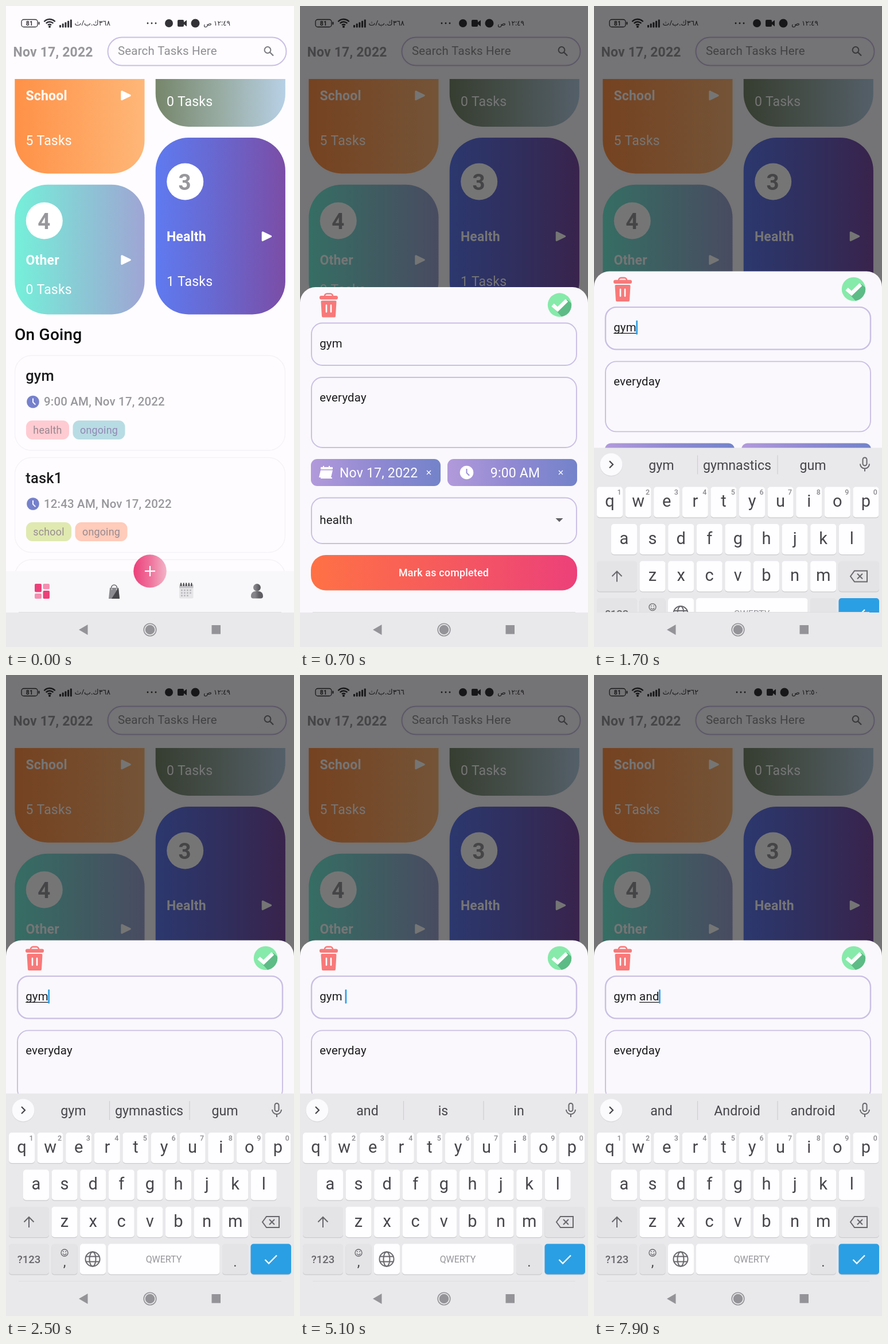
Recreate the animation shown at these times as an HTML page with a canvas. Size 502 px wide and 1115 px high, loop 8000 ms.

```html
<!DOCTYPE html>
<html lang="en">
<head>
<meta charset="utf-8">
<title>Task planner</title>
<style>
html, body { margin: 0; width: 100%; height: 100%; overflow: hidden; background: #fefcff; }
canvas { display: block; width: 502px; height: 1115px; }
</style>
</head>
<body>
<canvas id="stage" width="502" height="1115"></canvas>
<script>
const ctx = document.getElementById('stage').getContext('2d');
const W = 502, H = 1115, NAV = 1055, LOOP = 8000;
const SHEET_H = 566, SHEET_MIN = 461.4, KEYS_TOP = 728;
const PAGE = '#fefcff', KEYS_BG = '#e9e8eb', GREY = '#98979b', LILAC = '#c9bfe5', INK = '#1c1b1e';

// Type sizes of the app
const SMALL = 17.9, BODY = 20.45, LARGE = 23, TITLE = 25.56, HEADING = 28.1;

// Typed text, composing start (-1: none) and keyboard suggestions over time
const typing = [
  [0, 'gym', 0, ['gym', 'gymnastics', 'gum']],
  [5000, 'gym ', -1, ['and', 'is', 'in']],
  [5300, 'gym a', 4, ['a', 'and', 'at']],
  [5500, 'gym an', 4, ['an', 'and', 'any']],
  [5700, 'gym and', 4, ['and', 'Android', 'android']],
  [5950, 'gym and ', -1, ['I', 'pool', 'the']],
  [7500, 'gym and', 4, ['and', 'Android', 'android']]
];
const OPEN = 441.5, FOCUS = 1400, KEYS_IN = 1560;

const clamp01 = v => Math.max(0, Math.min(1, v));
function bezier(x1, y1, x2, y2) {
  const at = (a, b, s) => 3 * a * s * (1 - s) ** 2 + 3 * b * s * s * (1 - s) + s ** 3;
  return x => {
    let lo = 0, hi = 1;
    for (let i = 0; i < 24; i++) {
      const mid = (lo + hi) / 2;
      if (at(x1, x2, mid) < x) lo = mid; else hi = mid;
    }
    return at(y1, y2, hi);
  };
}
const decelerate = bezier(0, 0, 0.2, 1);
const ease = bezier(0.25, 0.1, 0.25, 1);

function across(x0, x1, ...colors) {
  const g = ctx.createLinearGradient(x0, 0, x1, 0);
  colors.forEach((c, i) => g.addColorStop(i / (colors.length - 1), c));
  return g;
}
function box(x, y, w, h, r, fill, stroke, lw = 2) {
  ctx.beginPath();
  ctx.roundRect(x, y, w, h, r);
  if (fill) { ctx.fillStyle = fill; ctx.fill(); }
  if (stroke) { ctx.strokeStyle = stroke; ctx.lineWidth = lw; ctx.stroke(); }
}
function disc(x, y, r, fill) {
  ctx.beginPath();
  ctx.arc(x, y, r, 0, 7);
  ctx.fillStyle = fill;
  ctx.fill();
}
function trace(points, close) {
  ctx.beginPath();
  points.forEach(([x, y]) => ctx.lineTo(x, y));
  if (close) ctx.closePath();
}
function poly(points, fill) {
  trace(points, true);
  ctx.fillStyle = fill;
  ctx.fill();
}
function line(points, color, lw = 2, close = false) {
  trace(points, close);
  ctx.strokeStyle = color;
  ctx.lineWidth = lw;
  ctx.stroke();
}
function arc(x, y, r, a, b, color, lw) {
  ctx.beginPath();
  ctx.arc(x, y, r, a, b);
  ctx.strokeStyle = color;
  ctx.lineWidth = lw;
  ctx.stroke();
}
function text(str, x, y, size, color, weight = 400, align = 'left') {
  ctx.font = `${weight} ${size}px Roboto, sans-serif`;
  ctx.textAlign = align;
  ctx.fillStyle = color;
  ctx.fillText(str, x, y);
}
function arabic(str, x, y, size) {
  ctx.save();
  ctx.direction = 'rtl';
  ctx.letterSpacing = '0px';
  ctx.font = `${size}px "Noto Sans", "DejaVu Sans", sans-serif`;
  ctx.textAlign = 'right';
  ctx.fillStyle = '#333236';
  ctx.fillText(str, x, y);
  ctx.restore();
}
function clock(x, y, r, face, hands) {
  disc(x, y, r, face);
  line([[x, y - r * 0.55], [x, y + r * 0.05], [x + r * 0.4, y + r * 0.45]], hands, r * 0.17);
}

function statusBar(t) {
  const c = '#333236', late = t >= 6800, dx = late ? 2 : 0;
  box(27, 23.5, 28, 13, 4, null, c, 1.3);
  box(56.5, 27.5, 2, 5, 1, c);
  text('81', 41, 33.8, 10.5, c, 700, 'center');
  for (const r of [4, 8.5, 13]) arc(76, 36, r, -2.4, -0.74, c, 2.4);
  disc(76, 36, 2, c);
  for (let i = 0; i < 5; i++) box(93 + i * 4.7, 33 - i * 2.4, 3, 4.5 + i * 2.4, 1, c);
  arabic((t < 3000 ? '٣٦٨' : late ? '٣٦٢' : '٣٦٦') + 'ك.ب/ث', 182, 34, 12.6);
  for (let i = 0; i < 3; i++) disc(247 + dx + i * 7, 30, 1.4, c);
  disc(284 + dx, 30, 7, c);
  box(299 + dx, 24, 11, 12, 2, c);
  poly([[309 + dx, 29], [315 + dx, 24.5], [315 + dx, 35.5], [309 + dx, 31]], c);
  disc(330 + dx, 30, 7.5, c);
  arabic((late ? '١٢:٥٠' : '١٢:٤٩') + ' ص', 391, 34, 12);
}

function playMark(x, y) {
  ctx.lineJoin = 'round';
  const p = [[x + 1.5, y - 7], [x + 16, y], [x + 1.5, y + 7]];
  poly(p, '#fff');
  line(p, '#fff', 3, true);
  ctx.lineJoin = 'miter';
}
function category(x, y, w, h, colors, name, nameY, count, countY, number, numberY) {
  box(x, y, w, h, 57.5, across(x, x + w, ...colors));
  if (name) {
    text(name, x + 19.2, nameY, LARGE, '#fff', 700);
    playMark(x + 185, nameY - 8.3);
  }
  text(count, x + 19.2, countY, LARGE, '#fff');
  if (number) {
    disc(x + 51.5, numberY, 32, '#fff');
    text(number, x + 51, numberY + 14, 38.5, GREY, 700, 'center');
  }
}
function tag(label, x, y, w, fill, color) {
  box(x, y, w, 33, 11, fill);
  text(label, x + w / 2, y + 23, SMALL, color, 400, 'center');
}
function taskCard(y, name, time) {
  box(15.5, y, 471, 165, 29, null, '#f4f2f6', 1.3);
  if (!name) return;
  text(name, 34.2, y + 44, TITLE, INK, 500);
  clock(47, y + 80.5, 10.8, '#7681cc', '#fff');
  text(time, 66, y + 87, BODY, GREY, 500);
}

function tabBar() {
  box(0, 983, W, 72, 0, '#f8f7f9');
  box(50, 1005, 12, 14.5, 2, '#ec407a');
  box(64.5, 1005, 11.5, 9.5, 2, '#f48fb1');
  box(50, 1022, 12, 9, 2, '#f48fb1');
  box(64.5, 1017, 11.5, 14, 2, '#ec407a');

  arc(188.5, 1012, 5, Math.PI, 0, '#6b6a6f', 1.5);
  poly([[181, 1012], [196, 1012], [198, 1031], [179, 1031]], '#8b8a8e');
  poly([[196, 1012], [198, 1031], [184, 1031]], '#48474b');
  line([[184.5, 1013], [184.5, 1016]], '#ddd', 1);
  line([[192.5, 1013], [192.5, 1016]], '#ddd', 1);

  box(302, 1006, 24.5, 24.5, 2, '#e6e5e8');
  box(302, 1006, 24.5, 6.5, 1, '#c3c2c6');
  for (let i = 0; i < 5; i++) line([[305 + i * 4.6, 1003.5], [305 + i * 4.6, 1009]], '#29282b', 1.7);
  for (let i = 0; i < 11; i++) box(305 + (i % 4) * 5, 1015 + Math.floor(i / 4) * 4.7, 2.8, 2.5, 0, '#b8b7bb');

  const user = across(427, 448, '#858488', '#858488', '#5f5e62', '#5f5e62');
  disc(437.5, 1011.5, 6.5, user);
  box(427, 1018, 21, 12.5, [8, 8, 4, 4], user);

  disc(251, 983, 28.8, across(222, 280, '#ec407a', '#ef719b', '#f3b4c8'));
  line([[242, 983], [260, 983]], '#fff', 2.3);
  line([[251, 974], [251, 992]], '#fff', 2.3);
}

function home(t) {
  box(0, 0, W, H, 0, PAGE);
  statusBar(t);
  text('Nov 17, 2022', 12.5, 87.5, LARGE, GREY, 700);
  box(177.5, 54.5, 311, 49, 24.5, null, LILAC, 2);
  text('Search Tasks Here', 195, 85, BODY, '#8f8e92');
  arc(456, 76.5, 5.4, 0, 7, '#7c7b80', 2);
  line([[460, 80.5], [466, 86.5]], '#7c7b80', 2.3);

  ctx.save();
  ctx.beginPath();
  ctx.rect(0, 127, W, 870);
  ctx.clip();
  category(15.3, -16, 226.2, 307.5, ['#ff9147', '#feb778'], 'School', 164, '5 Tasks', 242);
  category(260.7, -16, 226.2, 226, ['#76866b', '#98aca3', '#b7d0e5'], null, 0, '0 Tasks', 174);
  category(15.3, 310.7, 226.2, 225.8, ['#75f0da', '#8ac9d5', '#9fa5d4'], 'Other', 450, '0 Tasks', 501, '4', 373.5);
  category(260.7, 229, 226.2, 307.5, ['#5f7af0', '#6966cd', '#7b4da6'], 'Health', 409, '1 Tasks', 487, '3', 305.5);
  text('On Going', 15, 581, HEADING, '#080809', 500);
  taskCard(608, 'gym', '9:00 AM, Nov 17, 2022');
  tag('health', 35, 721, 75, '#ffcbd2', '#99868f');
  tag('ongoing', 116.5, 721, 91, t < OPEN ? '#b8dce3' : '#b5d9f8', '#9188b4');
  taskCard(785.5, 'task1', '12:43 AM, Nov 17, 2022');
  tag('school', 35, 898, 79, '#e0e9b0', '#978d92');
  tag('ongoing', 120.5, 898, 91, '#ffcbba', '#988a91');
  taskCard(963);
  ctx.restore();
  tabBar();
}

function trash(y) {
  const c = '#f87979';
  box(43, y + 11.5, 14, 8, 4, null, c, 2.6);
  box(34, y + 15, 32, 6.5, 3, c);
  ctx.lineJoin = 'round';
  const body = [[38.5, y + 25.5], [61.5, y + 25.5], [60, y + 50.5], [40, y + 50.5]];
  poly(body, c);
  line(body, c, 4, true);
  ctx.lineCap = 'round';
  for (const x of [46, 54]) line([[x, y + 31.5], [x, y + 43]], '#fff', 2.6);
  ctx.lineCap = 'butt';
  ctx.lineJoin = 'miter';
}
function doneMark(y) {
  const cy = y + 31;
  ctx.save();
  disc(452.5, cy, 20.7, '#86eaaa');
  ctx.clip();
  poly([[466, cy - 9], [490, cy + 12], [470, cy + 36], [441, cy + 4], [450, cy + 6]], '#5dbb86');
  ctx.restore();
  line([[440.5, cy], [449, cy + 7.5], [465, cy - 8]], '#fff', 6.5);
}
function titleText(t, y) {
  const [since, value, start] = typing.findLast(s => t >= s[0]);
  const x = 34.2, base = y + 105;
  text(value, x, base, BODY, INK);
  if (t < FOCUS) return;
  const end = x + ctx.measureText(value).width;
  if (start >= 0) {
    const from = x + ctx.measureText(value.slice(0, start)).width;
    line([[from, base + 3], [end, base + 3]], INK, 1.3);
  }
  if ((t - Math.max(FOCUS, since)) % 1000 < 500) box(end - 0.5, y + 85.5, 2.7, 24.5, 1, '#2c9fe6');
}
function sheet(t, y) {
  ctx.save();
  ctx.beginPath();
  ctx.rect(0, 0, W, NAV);
  ctx.clip();
  box(0, y, W, SHEET_H + 40, [27, 27, 0, 0], '#faf8fc');
  trash(y);
  doneMark(y);
  box(20, y + 62.5, 462, 73.5, 19, null, LILAC, t < FOCUS ? 1.9 : 2.4);
  titleText(t, y);
  box(20, y + 157, 462, 122, 19, null, LILAC, 1.9);
  text('everyday', 34.2, y + 199, BODY, INK);

  for (const x of [19, 257]) {
    box(x, y + 299, 226, 47, 11, across(x, x + 226, '#b29adb', '#9089d2', '#7383ca'));
    const cx = x === 19 ? 224.5 : 454.5, cy = y + 322.5;
    line([[cx - 3.5, cy - 3.5], [cx + 3.5, cy + 3.5]], '#fff', 1.2);
    line([[cx - 3.5, cy + 3.5], [cx + 3.5, cy - 3.5]], '#fff', 1.2);
  }
  box(36, y + 313, 21, 4, 1, '#fff');
  for (const x of [41, 51]) line([[x, y + 311], [x, y + 315]], '#fff', 2);
  poly([[36, y + 318.5], [57, y + 318.5], [54, y + 331], [33, y + 331]], '#fff');
  box(36, y + 331, 20, 2, 0, '#fff');
  text('Nov 17, 2022', 69, y + 330.5, LARGE, '#fff');
  clock(290.5, y + 322.5, 11.8, '#fff', '#9c8fd6');
  text('9:00 AM', 375, y + 330.5, LARGE, '#fff', 400, 'center');

  box(20, y + 366.5, 462, 79.5, 19, null, LILAC, 1.9);
  text('health', 34.2, y + 412, BODY, INK);
  poly([[445.5, y + 402], [458.5, y + 402], [452, y + 408.5]], '#626166');
  box(19, y + 466, 464, 61.5, 26, across(19, 483, '#ff7145', '#f65a5d', '#ec407a'));
  text('Mark as completed', 250.5, y + 503, SMALL, '#fff', 500, 'center');
  ctx.restore();
}

function key(x, y, w, fill = '#fefdff') {
  box(x, y + 1.3, w, 53, 5, '#cbcacd');
  box(x, y, w, 53, 5, fill);
}
function keyboard(t) {
  const c = '#47464a', dim = '#68676b', shade = '#e4e3e6', pitch = 49.6;
  box(0, KEYS_TOP, W, H, 0, KEYS_BG);
  disc(30, 758, 19.8, '#dad9dc');
  disc(30, 757, 19.5, '#fbfafc');
  line([[27, 751], [33, 757], [27, 763]], c, 2.2);
  const words = typing.findLast(s => t >= s[0])[3];
  words.forEach((w, i) => text(w, 117.5 + i * 132, 766, 23.2, c, 400, 'center'));
  for (const x of [180.5, 320]) line([[x, 741], [x, 774]], '#cfced1', 1.2);
  box(468.5, 745, 7, 14, 3.5, null, dim, 2);
  arc(472, 756, 8, 0, Math.PI, dim, 2);
  line([[472, 764], [472, 769]], dim, 2);

  [['qwertyuiop', 5, 796], ['asdfghjkl', 30, 860.5], ['zxcvbnm', 79.5, 925]].forEach(([letters, x0, y], row) => {
    [...letters].forEach((ch, i) => {
      const x = x0 + i * pitch;
      key(x, y, 45);
      text(ch, x + 22.5, y + 34.5, 29, c, 400, 'center');
      if (row === 0) text((i + 1) % 10, x + 39, y + 13.5, 12.5, '#8b8a8e', 500, 'center');
    });
  });

  key(5, 925, 70, shade);
  line([[40, 961], [40, 943]], dim, 2);
  line([[31.5, 951.5], [40, 943], [48.5, 951.5]], dim, 2);
  key(426.5, 925, 70.5, shade);
  line([[447, 951.5], [454, 942], [476, 942], [476, 961], [454, 961]], dim, 2, true);
  line([[459, 947], [468, 956]], dim, 2);
  line([[468, 947], [459, 956]], dim, 2);

  const y = 989.5;
  key(5, y, 70, shade);
  text('?123', 40, 1023, 18.5, dim, 500, 'center');
  key(79.5, y, 45, shade);
  arc(102, 1005, 6, 0, 7, dim, 1.3);
  arc(102, 1005.5, 3, 0.2, 2.9, dim, 1.2);
  disc(99.8, 1003, 0.9, dim);
  disc(104.2, 1003, 0.9, dim);
  text(',', 102, 1029, 24, c, 400, 'center');
  key(129, y, 45);
  for (const rx of [12.5, 5.5]) {
    ctx.beginPath();
    ctx.ellipse(151, 1016, rx, 12.5, 0, 0, 7);
    ctx.strokeStyle = dim;
    ctx.lineWidth = 2;
    ctx.stroke();
  }
  for (const dy of [-4.5, 4.5]) line([[139.5, 1016 + dy], [162.5, 1016 + dy]], dim, 2);
  key(178, y, 194.5);
  text('QWERTY', 275, 1022, 16, '#969599', 400, 'center');
  key(377, y, 45, shade);
  text('.', 399.5, 1029, 24, c, 400, 'center');
  key(426.5, y, 70.5, '#2b9fe4');
  line([[451.5, 1017], [458, 1023.5], [472, 1009.5]], '#fff', 2.3);
}

function systemNav(fill, lineColor) {
  box(0, NAV, W, H - NAV, 0, fill);
  line([[22, 1054.5], [480, 1054.5]], lineColor, 1);
  const c = '#949397';
  poly([[127, 1085], [142.5, 1076], [142.5, 1094]], c);
  disc(251, 1085, 8.3, c);
  arc(251, 1085, 10.8, 0, 7, c, 1.6);
  box(358.5, 1077, 15.5, 15.5, 0, c);
}

function draw(t) {
  ctx.letterSpacing = '0.19px';
  home(t);
  const open = clamp01((t - OPEN) / 250);
  const rise = decelerate(clamp01((t - KEYS_IN) / 240));
  const keysY = H - (H - KEYS_TOP) * rise;
  if (open > 0) {
    box(0, 0, W, NAV, 0, `rgba(0,0,0,${0.54 * ease(open)})`);
    const inset = Math.max(0, NAV - keysY);
    const rest = Math.max(SHEET_MIN, NAV - SHEET_H - inset);
    sheet(t, NAV - (NAV - rest) * decelerate(open));
  }
  ctx.letterSpacing = '0px';
  if (rise > 0) {
    ctx.save();
    ctx.translate(0, keysY - KEYS_TOP);
    keyboard(t);
    ctx.restore();
    systemNav(KEYS_BG, '#dedde0');
  } else {
    systemNav(PAGE, '#f3f2f5');
  }
}

function tick(now) {
  draw(now % LOOP);
  requestAnimationFrame(tick);
}
draw(0);
requestAnimationFrame(tick);
</script>
</body>
</html>
```
